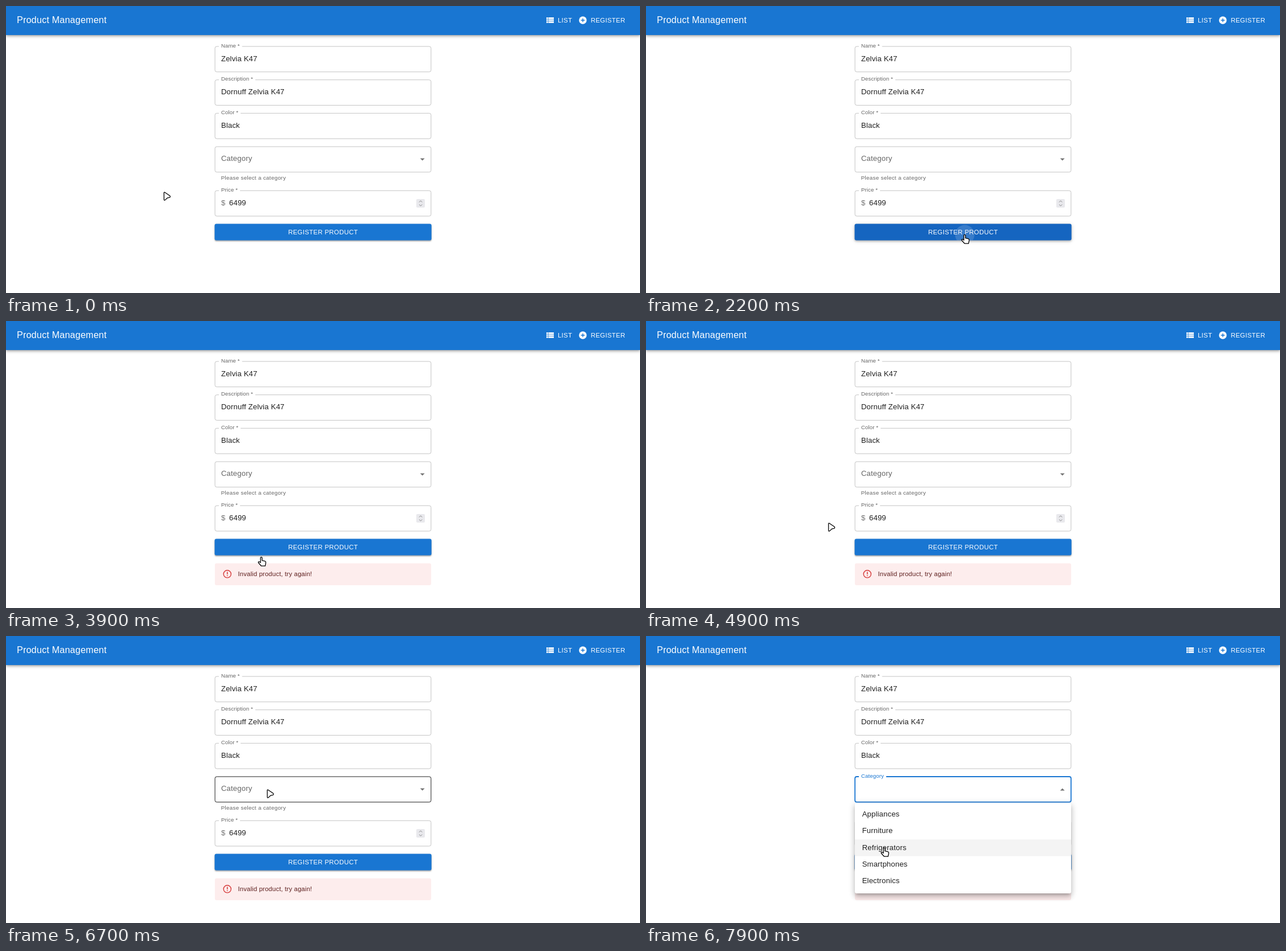
Animation, 1111 px wide and 504 px high, one loop 8000 ms. Source, as an HTML page:

```html
<!DOCTYPE html>
<html lang="en">
<head>
<meta charset="utf-8">
<title>Product Management</title>
<style>
  html, body { margin: 0; width: 100%; height: 100%; overflow: hidden; background: #fff; }
  div, svg { position: absolute; }
  #stage, .full { left: 0; top: 0; width: 100%; height: 100%; overflow: hidden; }
  text { font: 13.1px "Liberation Sans", Arial, sans-serif; letter-spacing: .012em; fill: #212121; }
  .label { font-size: 9.6px; fill: #666; }
  .help { font-size: 9.75px; letter-spacing: .033em; fill: #666; }
  .caps { font-size: 11.3px; letter-spacing: .03em; fill: #fff; }
  .title { font-size: 16.1px; fill: #fff; }
  .alert { font-size: 11.3px; fill: #5f2120; }
  .gray { fill: #757575; }
  #bar { left: 0; top: 0; width: 100%; height: 51px; background: #1976d2;
    box-shadow: 0 1.6px 3.2px -.8px #0003, 0 3.2px 4px #00000024, 0 .8px 8px #0000001f; }
  #btn { left: 366px; top: 383px; width: 379.5px; height: 29.2px; border-radius: 3px; overflow: hidden;
    transform: translate(-.4px, -.4px);
    background: color-mix(in srgb, #1565c0 calc(100% * var(--hover)), #1976d2);
    box-shadow: 0 1.6px calc(1.6px + 2px * var(--hover)) #0004,
      0 .8px calc(4px + 4px * var(--hover)) #0000001f; }
  #ripple { left: 193px; top: 19px; width: 2px; height: 2px; margin: -1px; border-radius: 50%; background: #fff; }
  #menu { left: 366px; top: 293px; width: 379px; height: 159px; border-radius: 3px; background: #fff;
    transform-origin: 50% 0;
    box-shadow: 0 4px 4px -2.4px #0003, 0 6.4px 8px .8px #00000024, 0 2.4px 11.2px 1.6px #0000001f; }
</style>
</head>
<body>
<div id="stage">
  <div id="bar"></div>
  <div id="btn"><div id="ripple"></div></div>
  <svg class="full">
    <text class="title" x="19" y="29.5">Product Management</text>
    <path d="M947 21.4h13m-13 3.5h13m-13 3.5h13" stroke="#fff" stroke-width="2.7" stroke-dasharray="2.7 .7 9.6"/>
    <text class="caps" x="967" y="28.5">LIST</text>
    <circle cx="1010.8" cy="25" r="6.7" fill="#fff"/>
    <path d="M1007.5 25h6.6m-3.3-3.3v6.6" stroke="#1976d2" stroke-width="1.4"/>
    <text class="caps" x="1024.7" y="28.5">REGISTER</text>
    <g id="fields"></g>
    <path id="arrow" class="gray" d="M-4-2h8l-4 4z"/>
    <text class="help" x="376.7" y="304.5">Please select a category</text>
    <text class="gray" x="377" y="349.5">$</text>
    <rect x="719" y="339" width="15" height="15" rx="2" fill="#e9e9ed"/>
    <path d="M724 344.5l2.6-2.6 2.6 2.6m-5.2 4l2.6 2.6 2.6-2.6" fill="none" stroke="#888"/>
    <text class="caps" x="494.5" y="400.5">REGISTER PRODUCT</text>
    <g id="alert">
      <rect x="366" y="425.5" width="379" height="38.5" rx="3.2" fill="#fdeded"/>
      <circle cx="387.8" cy="444.3" r="6.6" fill="none" stroke="#d63a3a" stroke-width="1.4"/>
      <path d="M387.8 440.6v4.4m0 1.5v1.5" stroke="#d63a3a" stroke-width="1.5"/>
      <text class="alert" x="406.5" y="448">Invalid product, try again!</text>
    </g>
  </svg>
  <div id="menu"><svg id="items" class="full"></svg></div>
  <svg class="full">
    <g id="cursor" fill="#fff" stroke="#000" stroke-width="1.3" stroke-linejoin="round">
      <path id="pointer" d="M.8 1.8Q1.2.5 2.3 1.3L10.8 7Q12.6 8.6 11 10.2L6.5 11.2 3 14.6Q1.2 16 .9 13.8Z"/>
      <path id="hand" d="M-2 2a1.4 1.4 0 0 1 2.8 0v4.6l4.8 1.1q1.9.6 1.7 2.6l-1.1 5.9h-6.8l-4.9-5.4q-.9-1.6.6-2.1 1.2 0 2.9 1.6z"/>
    </g>
  </svg>
</div>
<script>
const $ = id => document.getElementById(id);
const progress = (t, a, b) => Math.max(0, Math.min(1, (t - a) / (b - a)));
const mix = (a, b, p) => a + (b - a) * p;
const show = (id, on) => $(id).style.opacity = +on;

const values = { Name: "Zelvia K47", Description: "Dornuff Zelvia K47", Color: "Black", Category: "", Price: "6499" };
const pitch = 58.67;
$("fields").innerHTML = Object.entries(values).map(([name, value], i) => {
  const price = name == "Price";
  const top = 71 + i * pitch + (price ? 18.6 : 0);
  return `<g id="${name}">
    <rect class="frame" x="366.2" y="${top}" width="378.6" height="44.7" rx="3.2" fill="none" stroke="#c4c4c4"/>
    <rect class="gap" x="373" y="${top - 2}" height="4" fill="#fff"/>
    <text class="label" x="377" y="${top + 1.7}">${name}${value && " *"}</text>
    <text x="${price ? 391 : 377}" y="${top + 25.8}">${value}</text></g>`;
}).join("");
for (const gap of document.querySelectorAll(".gap"))
  gap.setAttribute("width", gap.nextElementSibling.getComputedTextLength() + 8);

const row = 29.3;
$("items").innerHTML = `<rect id="hover" width="379" height="${row}" fill="#f4f4f4"/>` +
  ["Appliances", "Furniture", "Refrigerators", "Smartphones", "Electronics"]
    .map((name, i) => `<text x="12.7" y="${24 + i * row}">${name}</text>`).join("");

// pointer moves: start, end, x, y
const moves = [
  [600, 1400, 556, 410], [1400, 1600, 559, 401],
  [2900, 3000, 490, 437], [3000, 3300, 448, 414],
  [4500, 4700, 297, 387], [4800, 4900, 319, 354], [4900, 5200, 404, 281],
  [5300, 5700, 471, 264], [5800, 6100, 457, 269],
  [7300, 7500, 447, 298], [7600, 7900, 418, 371],
];
// the pointer turns into a hand and back at these times
const swaps = [1500, 3000, 3300, 4200, 5100, 6700, 7500];

function drawCursor(t) {
  let x = 276, y = 326;
  for (const [start, end, toX, toY] of moves) {
    const p = progress(t, start, end), ease = p * (2 - p);
    x = mix(x, toX, ease);
    y = mix(y, toY, ease);
  }
  const hand = swaps.filter(s => t >= s).length % 2;
  $("cursor").setAttribute("transform", `translate(${x} ${y})`);
  show("hand", hand);
  show("pointer", !hand);
  return y;
}

function drawButton(t) {
  $("btn").style.setProperty("--hover", progress(t, 1230, 1480) - progress(t, 3000, 3250));
  const grow = progress(t, 2200, 2500);
  $("ripple").style.transform = `scale(${mix(17, 195, grow)})`;
  show("ripple", 0);
  if (t >= 2200 && t < 2800) $("ripple").style.opacity = mix(.15, .03, grow);
}

function drawSelect(t, y) {
  const open = t >= 6900, p = progress(t, 6800, 7000);
  const [frame, gap, label] = $("Category").children;
  frame.setAttribute("stroke", open ? "#1976d2" : t >= 5100 ? "#212121" : "#c4c4c4");
  frame.setAttribute("stroke-width", open ? 1.8 : 1);
  gap.style.opacity = +open;
  label.setAttribute("y", mix(272, 248.6, p));
  label.style.fontSize = mix(13.1, 9.6, p) + "px";
  label.style.fill = open ? "#1976d2" : "#666";
  $("arrow").setAttribute("transform", `translate(729.7 269.4) scale(1 ${open ? -1 : 1})`);
  show("menu", p);
  $("menu").style.transform = `scale(${mix(.75, 1, p)}, ${mix(.56, 1, p)})`;
  const i = Math.floor((y - 297.5) / row);
  $("hover").setAttribute("y", 5.7 + i * row);
  show("hover", t >= 7500 && i >= 0);
}

// the picture changes ten times a second
const start = performance.now();
function tick() {
  const t = Math.floor((performance.now() - start) % 8000 / 100) * 100;
  drawButton(t);
  show("alert", t >= 2300);
  drawSelect(t, drawCursor(t));
  requestAnimationFrame(tick);
}
tick();
</script>
</body>
</html>
```
